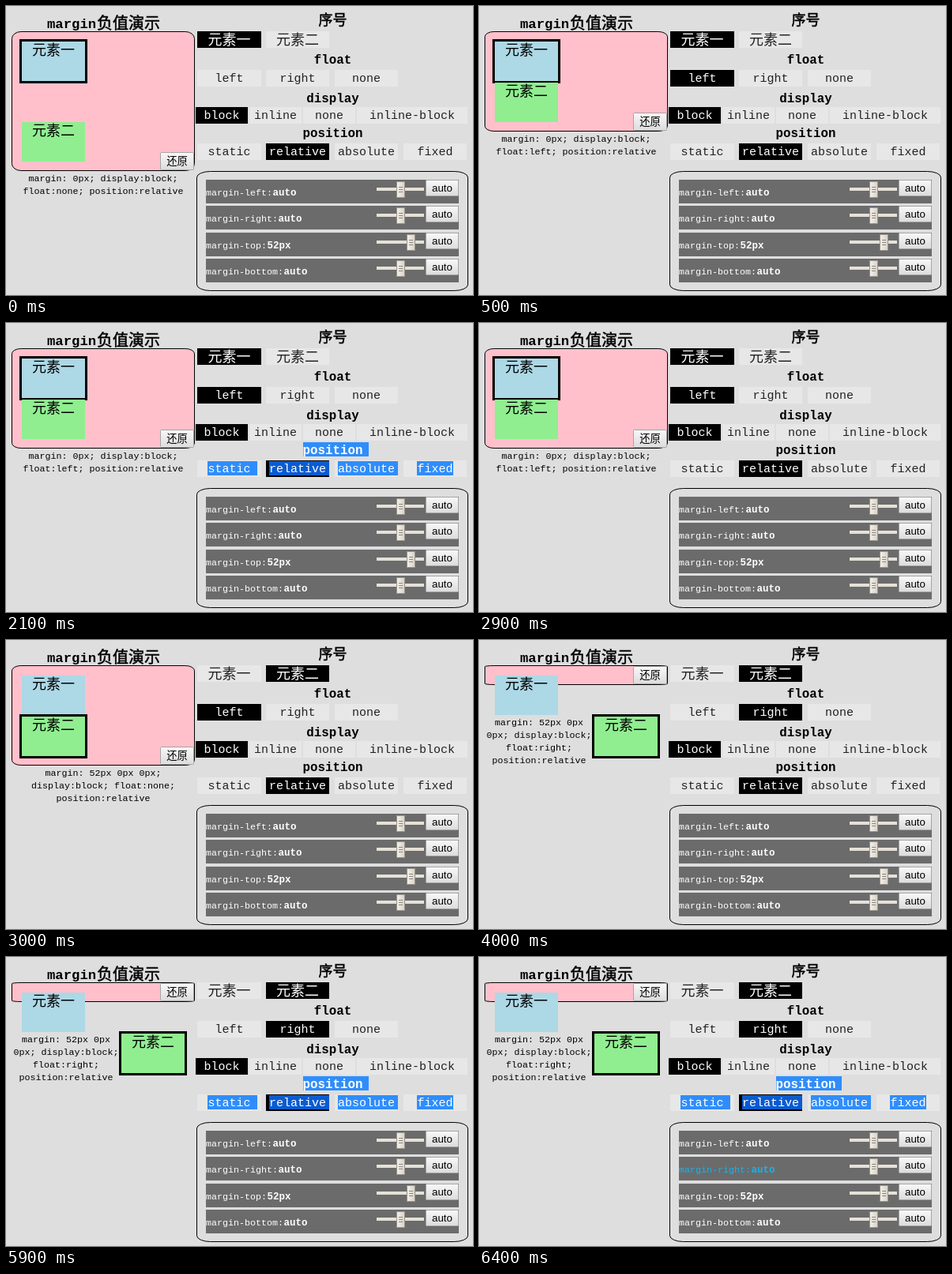
Write an HTML page that moves like this. It is 591 px wide and 366 px high and loops after 8 s.

```html
<!DOCTYPE html>
<html lang="zh">
<head>
<meta charset="utf-8">
<style>
html, body { margin: 0; width: 100%; height: 100%; overflow: hidden; background: #dedede; }
svg { display: block; }
text { font-family: "Liberation Mono", "Noto Sans CJK SC", "Noto Sans CJK JP", monospace; white-space: pre; }
.ui { font-family: "Liberation Sans", "Noto Sans CJK SC", "Noto Sans CJK JP", sans-serif; }
</style>
</head>
<body>
<svg id="stage" width="591" height="366" viewBox="0 0 591 366">
  <defs>
    <linearGradient id="button" x2="0" y2="1"><stop stop-color="#f8f8f8"/><stop offset="1" stop-color="#dcdcdc"/></linearGradient>
    <linearGradient id="thumb"><stop stop-color="#f4f1ea"/><stop offset="1" stop-color="#d8d2c8"/></linearGradient>
  </defs>
  <g id="scene"></g>
</svg>
<script>
const DURATION = 8000;
const scene = document.getElementById('scene');

// Where the two demo elements stand, and the resulting panel and caption.
const layouts = [
  { picked: 0, float: '', panelEnd: 209, second: [20, 147], captionX: 123, captionY: 222,
    caption: ['margin: 0px; display:block;', 'float:none; position:relative'] },
  { picked: 0, float: 'left', panelEnd: 159, second: [20, 97], captionX: 123, captionY: 172,
    caption: ['margin: 0px; display:block;', 'float:left; position:relative'] },
  { picked: 1, float: 'left', panelEnd: 159, second: [20, 97], captionX: 123, captionY: 172,
    caption: ['margin: 52px 0px 0px;', 'display:block; float:none;', 'position:relative'] },
  { picked: 1, float: 'right', panelEnd: 57, second: [146, 97], captionX: 76, captionY: 108,
    caption: ['margin: 52px 0px', '0px; display:block;', 'float:right;', 'position:relative'] }
];

const rect = (x, y, w, h, fill, extra = '') =>
  `<rect x="${x}" y="${y}" width="${w}" height="${h}" fill="${fill}" ${extra}/>`;

// Latin glyphs are half an em wide, so the 0.6em mono font is scaled by 1/1.2.
// Chinese glyphs sit a little lower and are emboldened with a thin stroke.
function text(x, y, str, em, { fill = '#000', bold = false, anchor = 'middle' } = {}) {
  const latin = /^[\x00-\x7f]*$/.test(str);
  const style = latin
    ? `y="${y}" font-size="${em / 1.2}" font-weight="${bold ? 700 : 400}"`
    : `y="${y + 1.5}" font-size="${em}" font-weight="300" ${bold ? `stroke="${fill}" stroke-width=".5"` : ''}`;
  return `<text x="${x}" ${style} fill="${fill}" text-anchor="${anchor}">${str}</text>`;
}

// Corner radii are 5% of each side.
const panel = (x, y, w, h, fill) =>
  rect(x + .5, y + .5, w - 1, h - 1, fill, `rx="${w * .05}" ry="${h * .05}" stroke="#000"`);

const button = (x, y, w, h, label) =>
  rect(x + .5, y + .5, w - 1, h - 1, 'url(#button)', 'rx="1" stroke="#a5a5a5"') +
  `<text class="ui" x="${x + w / 2}" y="${y + h / 2 + 4}" font-size="13.33" text-anchor="middle">${label}</text>`;

function element(name, [x, y], color, outlined) {
  const outline = outlined ? rect(x - 3, y - 3, 86, 56, '#000') : '';
  return outline + rect(x, y, 80, 50, color) + text(x + 40, y + 15.5, name, 18);
}

function demo({ picked, panelEnd, second, captionX, captionY, caption }) {
  return text(52, 28, 'margin', 20.7, { bold: true, anchor: 'start' }) +
    text(115, 27, '负值演示', 20, { bold: true, anchor: 'start' }) +
    panel(7, 32, 232, panelEnd - 32, '#ffc0cb') +
    button(195, panelEnd - 24, 43, 23, '还原') +
    element('元素一', [20, 45], '#add8e6', picked === 0) +
    element('元素二', second, '#90ee90', picked === 1) +
    caption.map((line, i) => text(captionX, captionY + i * 16, line, 14)).join('');
}

// One heading with its row of options; highlight shows the text selection.
function optionRow(title, headY, y, names, active, cells, highlight) {
  const em = title === '序号' ? 18 : 19;
  let out = highlight ? rect(376, 151, 83, 18, '#2f8dfb') : '';
  out += text(413.5, headY + 5.5, title, em, { bold: true, fill: highlight ? '#fff' : '#000' });
  names.forEach((name, i) => {
    const [x, w] = cells[i];
    const on = name === active;
    const center = x + w / 2;
    out += rect(x, y, w, 21, on ? '#000' : '#e7e7e7');
    if (highlight) {
      const half = name.length * 4.5;
      const left = Math.floor(center - half);
      const right = i === names.length - 1 ? Math.ceil(center + half) : Math.min(x + w, Math.ceil(center + half + 8));
      out += rect(left, y + 1, right - left, 18, on ? '#0a5bd0' : '#2f8dfb');
    }
    out += text(center, y + 15, name, 18, { fill: on || highlight ? '#fff' : '#222' });
  });
  return out;
}

function sliderRow(name, value, y, thumbX, hovered) {
  const fill = hovered ? '#14b4f0' : '#fff';
  const grip = [9, 12, 15].map(d => rect(thumbX + 3, y + d, 5, 1, '#8d887f')).join('');
  return rect(253, y, 320, 30, '#6b6b6b') +
    text(253, y + 20, name + ':', 14, { fill, anchor: 'start' }) +
    text(253.5 + (name.length + 1) * 7, y + 20, value, 15, { fill, bold: true, anchor: 'start' }) +
    rect(469, y + 10, 60, 4, '#e6e1d8') +
    rect(thumbX + .5, y + 2.5, 10, 20, 'url(#thumb)', 'stroke="#9a958c"') + grip +
    button(531, y, 42, 21, 'auto');
}

function draw({ layout, selected, hover }) {
  const { picked, float } = layouts[layout];
  const cells = [[242, 81], [329, 80], [416, 80], [503, 80]];
  const displayCells = [[240, 66], [308, 66], [376, 66], [444, 140]];
  const items = ['元素一', '元素二'];
  const sliders = [['left', 'auto', 220, 494], ['right', 'auto', 253, 494], ['top', '52px', 287, 507], ['bottom', 'auto', 320, 494]];
  scene.innerHTML = demo(layouts[layout]) +
    optionRow('序号', 17, 32, items, items[picked], cells) +
    optionRow('float', 67, 81, ['left', 'right', 'none'], float, cells) +
    optionRow('display', 116, 128, ['block', 'inline', 'none', 'inline-block'], 'block', displayCells) +
    optionRow('position', 160, 174, ['static', 'relative', 'absolute', 'fixed'], 'relative', cells, selected) +
    panel(241, 209, 344, 152, '#dedede') +
    sliders.map(([side, value, y, x], i) => sliderRow('margin-' + side, value, y, x, hover === i)).join('');
}

function stateAt(t) {
  return {
    layout: t < 500 ? 0 : t < 3000 ? 1 : t < 4000 ? 2 : 3,
    selected: (t >= 2100 && t < 2900) || t >= 5900,
    hover: t < 6200 ? -1 : t < 6400 ? 0 : 1
  };
}

let shown = '';
const start = performance.now();
function tick() {
  const state = stateAt((performance.now() - start) % DURATION);
  const key = JSON.stringify(state);
  if (key !== shown) draw(state);
  shown = key;
  requestAnimationFrame(tick);
}
tick();
</script>
</body>
</html>
```
